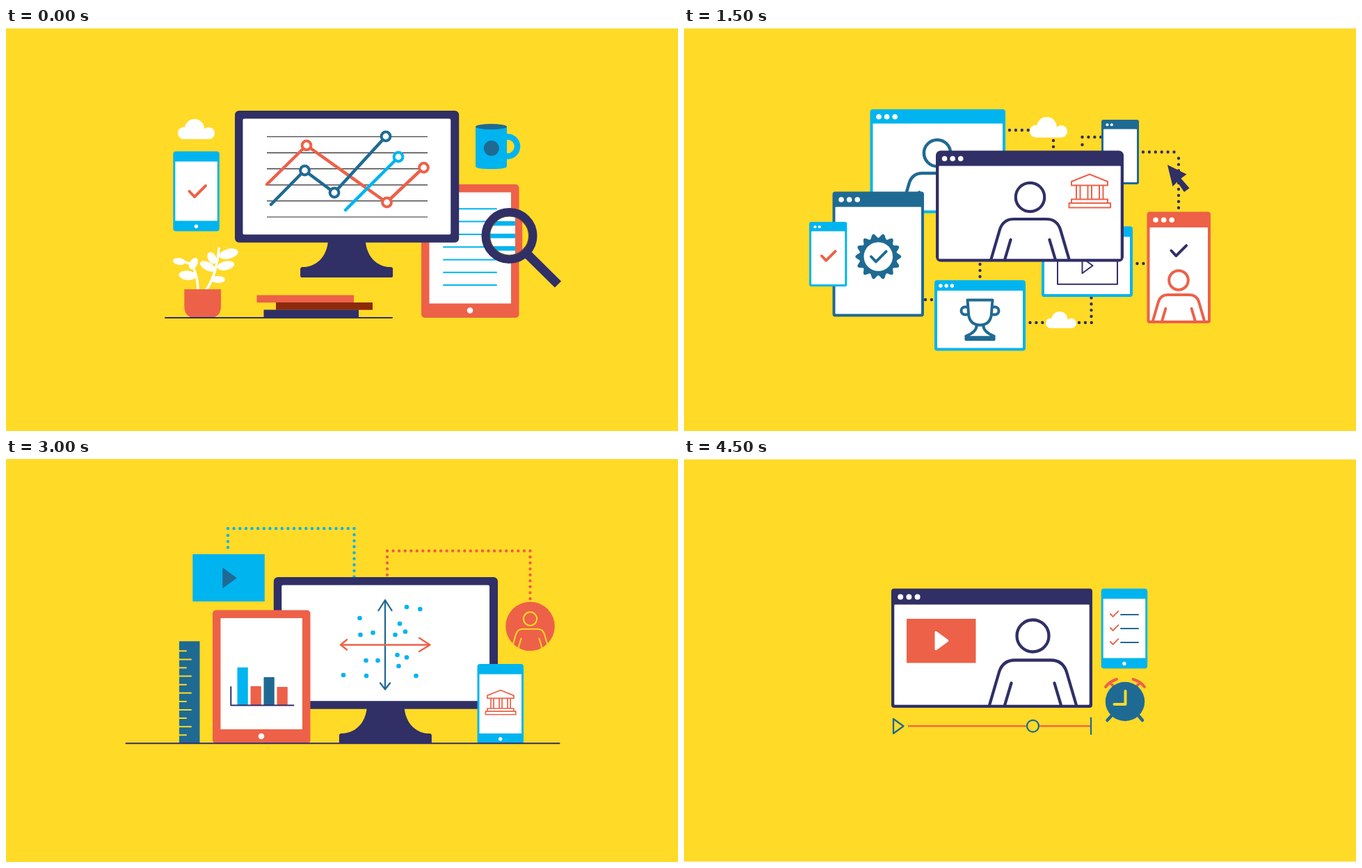
Recreate the animation shown at these times as an HTML page. Size 966 by 580 pixels, loop 5.25 s.

```html
<!DOCTYPE html>
<html lang="en">
<head>
<meta charset="utf-8">
<title>Digital work scenes</title>
<style>
html, body { margin: 0; width: 100%; height: 100%; overflow: hidden; background: #ffda27; }
svg { display: block; }
</style>
</head>
<body>
<svg id="stage" width="966" height="580" viewBox="0 0 966 580"></svg>
<script>
const SCENE_MS = 750;
const yellow = '#ffda27', navy = '#302f66', blue = '#00b4f0', teal = '#1f6a93',
  coral = '#ed6148', brown = '#8c2b0b', white = '#fff', edge = '#f8ecae';

// Primitives
const rect = (x, y, w, h, c, r = 0) => `<rect x="${x}" y="${y}" width="${w}" height="${h}" rx="${r}" fill="${c}"/>`;
const disc = (x, y, r, c) => `<circle cx="${x}" cy="${y}" r="${r}" fill="${c}"/>`;
const ring = (x, y, r, c, w, fill = 'none') => `<circle cx="${x}" cy="${y}" r="${r}" fill="${fill}" stroke="${c}" stroke-width="${w}"/>`;
const oval = (x, y, rx, ry, c, turn = 0) => `<ellipse rx="${rx}" ry="${ry}" fill="${c}" transform="translate(${x} ${y}) rotate(${turn})"/>`;
const shape = (d, c) => `<path d="${d}" fill="${c}" fill-rule="evenodd"/>`;
const line = (d, c, w, cap = 'round') => `<path d="${d}" fill="none" stroke="${c}" stroke-width="${w}" stroke-linecap="${cap}" stroke-linejoin="round"/>`;
const dotted = (d, c, gap = 8.7) => `<path d="${d}" fill="none" stroke="${c}" stroke-width="4.4" stroke-linecap="round" stroke-dasharray="0 ${gap}"/>`;
const group = (transform, ...parts) => `<g transform="${transform}">${parts.join('')}</g>`;
const place = (x, y, s, ...parts) => group(`translate(${x} ${y}) scale(${s})`, ...parts);
const range = (n, f) => Array.from({ length: n }, (_, i) => f(i)).join('');
const each = (points, f) => points.map(p => f(...p)).join('');

// Reusable objects
const ground = (x1, x2, y) => line(`M${x1} ${y}H${x2}`, navy, 2);
const cloud = (x, y, w) => place(x, y, w / 53,
  disc(8.8, 20.2, 8.8, white), disc(24, 14, 14, white), disc(44.4, 20.4, 8.6, white), rect(8.8, 16, 35.6, 13, white));
const check = (x, y, s, c, w) => line(`M${x} ${y}l${7.5 * s} ${8 * s} ${16 * s} ${-16 * s}`, c, w);
const person = (x, y, s, c, w) => place(x, y, s,
  ring(0, 0, 23, c, w / s),
  line('M-62.5 100L-48.5 52Q-43 35-26 35H26Q43 35 48.5 52L62.5 100M-40.5 100L-31 68M40.5 100L31 68', c, w / s));
const windowBox = (x, y, w, h, bar, c, b = 4, n = 3, r = 3.8, radius = 4) =>
  rect(x, y, w, h, c, radius) + rect(x + b, y + bar, w - 2 * b, h - bar - b, white, 1) +
  range(n, i => disc(x + r * (n > 2 ? 3.3 : 4) + i * 3.05 * r, y + bar / 2 + .5, r, white));
const tablet = (x, y) => rect(x, y, 140.5, 192, coral, 5) + rect(x + 11.5, y + 11.5, 117.5, 160, white) + disc(x + 70, y + 181.5, 4.3, white);
const phone = (x, y) => rect(x, y, 66.5, 115, blue, 4) + rect(x + 3, y + 14.7, 60.5, 85.3, white) + disc(x + 33.2, y + 108, 2.7, white);
const monitor = (x, y) => place(x, y, .996,
  rect(0, 0, 323.5, 190.5, navy, 6), rect(11.5, 11.5, 300, 167.5, white, 2),
  shape('M134.5 189C132 213 116 226 98 226Q94.5 226 94.5 229V239q0 2 2 2H226q2 0 2-2V229q0-3-3.5-3C207 226 191 213 188.5 189Z', navy));
const books = (x, y) => rect(x, y, 139.5, 10.7, coral) + rect(x + 27.5, y + 10.5, 139, 10.7, brown) + rect(x + 10, y + 21, 136.5, 11.5, navy);
const bank = (x, y, s) => place(x, y, s, line(
  'M4 17V11.5L30 1L56 11.5V17ZM11 17V37H16.5V17M27.5 17V37H33V17M44 17V37H49.5V17M4 37H56V42.5H4ZM.5 42.5H60V49H.5Z', coral, 2 / s ** .5));
const ruler = transform => group(transform, rect(0, 0, 29.5, 147, teal),
  range(11, i => line(`M0 ${14 + i * 12.1}H${i % 2 ? 17 : 10}`, yellow, 2)));
const video = (x, y) => rect(x, y, 103.5, 68, blue) + shape(`M${x + 43} ${y + 19.2}l20.5 15-20.5 15Z`, teal);
const badge = (x, y, r, c, face) => {
  const n = 280, points = Array.from({ length: n }, (_, i) => {
    const a = i / n * 2 * Math.PI, d = r * (.91 + .09 * Math.cos(14 * a));
    return (x + d * Math.cos(a)).toFixed(1) + ' ' + (y + d * Math.sin(a)).toFixed(1);
  });
  return shape(`M${points.join('L')}Z`, c) + disc(x, y, r * .63, face);
};
const trophy = (x, y, s, c, foot) => place(x, y, s, line(
  'M-30.5 0H30.5L27.5 38Q23 61 0 61Q-23 61-27.5 38ZM-30 17h-6.5a9.3 9.3 0 0 0 0 18.6h8.5M30 17h6.5a9.3 9.3 0 0 1 0 18.6h-8.5' + foot, c, 4 / s));
const bubble = (x, y, c) => rect(x, y, 94.5, 47.5, c, 14) + range(3, i => disc(x + 25 + i * 22.3, y + 24, 5.2, navy));
const node = (x, y, c, fill = white) => ring(x, y, 6.4, c, 4, fill);
const cross = (x, y, c) => line(`M${x - 7} ${y - 7}l14 14m0-14l-14 14`, c, 4);

const topEdge = rect(0, 0, 966, 1, edge), bottomEdge = rect(0, 579, 966, 1, edge);

const analytics = [
  topEdge, cloud(247, 131, 53), phone(240.3, 177.5), check(263.5, 235, 1, coral, 4),
  // plant
  line('M276 378Q276 358 268 342Q260 336 250 336M287 378Q303 356 306 317', white, 3.5),
  each([[249, 336, 9, 5, 8], [269.5, 339, 9, 5.5, -60], [261, 356, 12.5, 6.8, 5], [320, 325, 14, 7, -15],
    [296, 331, 9, 6, 62], [290, 343, 12, 6, 28], [316, 342, 12.5, 6.3, -12], [305, 362, 10, 5, 0]],
    (x, y, rx, ry, turn) => oval(x, y, rx, ry, white, turn)),
  shape('M256.3 376H309V400Q309 417 293 417H272Q256.3 417 256.3 400Z', coral),
  books(360.5, 384.5), ground(229, 555, 417),
  tablet(597, 225), range(7, i => line(`M629 ${260.3 + i * 18.3}H705`, blue, 2)),
  monitor(329, 119),
  range(6, i => line(`M375 ${156.5 + i * 23.1}H606`, '#2a2a2e', 1.2, 'butt')),
  line('M375 225L432 169L547 251L600 201', coral, 4.5),
  line('M381 254L429 205L472 237L546 156', teal, 4.5),
  line('M488 262L564 186', blue, 4.5),
  each([[432, 169], [547.5, 251], [600.5, 201]], (x, y) => node(x, y, coral)),
  each([[429.5, 205], [472, 237], [546, 156]], (x, y) => node(x, y, teal)),
  node(564, 185.5, blue),
  // mug
  ring(721, 170.5, 14, blue, 8.5), shape('M675 142H720V199Q720 203 697.5 203Q675 203 675 199Z', blue),
  oval(697.5, 142, 22.5, 4, teal), disc(697.8, 173, 11, teal),
  // magnifier
  line('M748 324L793.5 369', navy, 13, 'butt'),
  `<clipPath id="lens">${disc(723.5, 299, 30)}</clipPath><g clip-path="url(#lens)">`,
  rect(690, 265, 42, 70, white), rect(732, 265, 10.5, 70, coral), rect(742.5, 265, 15, 70, yellow),
  range(3, i => rect(690, 278 + i * 18, 42, 6.5, blue)), '</g>',
  ring(723.5, 299, 34, navy, 12), ring(723.5, 299, 28, '#574a35', 1.2)
];

const planning = [
  topEdge,
  group('translate(318 393) rotate(-5.6)', rect(0, -208, 321, 208, navy, 3), rect(12, -196, 297, 184, white, 1)),
  line('M391.5 190L410.5 369.5', navy, 2),
  range(8, i => line(`M${376 + i * 1.85} ${216.5 + i * 17.6}l-46 4.6`, navy, 4)),
  each([[441.5, 228.5, coral], [501, 222.3, navy], [560.5, 216.3, blue]], (x, y, c) =>
    ring(x, y, 16.7, c, 4) + line(`M${x - 9.7} ${y + 28}l26-2.5`, c, 4)),
  line('M431.5 281.5L436.5 334.5L588 319', navy, 4),
  line('M445 322L454 312Q460 306 466 313Q472 320 478 313L501 279Q507 270 512 278L515 284Q519 290 525 283Q529 280 533 283L554 301Q560 306 563 300L576 267', coral, 4.5),
  shape('M232.5 161L339 172.5L323.5 317.5L217 306Z', blue),
  line('M280 221L279 236.5M253 250L254.5 234L303.5 239L302 256', navy, 2, 'butt'),
  each([[281, 209.3], [251, 263], [300.3, 268]], (x, y) =>
    group(`translate(${x} ${y}) rotate(6)`, line('M-11-11H11V11H-11Z', white, 2))),
  ruler('translate(322 280) rotate(29.8) scale(.88 .855)'),
  rect(661.5, 160, 5.5, 11, teal), rect(657, 170, 14, 103, brown),
  shape('M657.5 275.5H670.5L664 286.5Z', brown), line('M655 179.5H678V211', coral, 4),
  shape('M599.5 311Q600 307 604 310L698 404Q701 409 696 409H599.5ZM617.5 355V387Q617.5 390 620.5 390H653Q658 389 655 386L622 353Q618 350 617.5 355Z', coral),
  range(10, i => line(`M${608 + i * 8} 409v${i % 2 ? -5 : -7}`, yellow, 2)),
  cloud(658, 310, 58.5)
];

const windows = [
  topEdge,
  dotted('M468 147H500M531 162V175M572.5 157H600M572.5 168V176M660 178.5H712M711 187.5V262M425.5 340V360M347 391H362M497.5 424H520M568 424H586M585.5 415V388M651.5 339H666', navy, 8.9),
  cloud(497, 128, 54), cloud(520, 408, 44),
  windowBox(267.5, 117, 194.5, 149.5, 20.5, blue), person(364, 180, .83, teal, 4.5),
  windowBox(600, 132, 54, 93, 13.5, teal, 3, 2, 2.1, 3),
  windowBox(514, 285.5, 131, 101.5, 15, blue, 4, 3, 2.7),
  line('M537 310H623V368.8H537Z', navy, 2), line('M572.5 331V353L587.5 342Z', navy, 2),
  windowBox(213.5, 235.5, 131.5, 180, 22, teal),
  badge(279.3, 329, 33, teal, white), check(269, 329, .92, teal, 4),
  windowBox(180, 279, 54.3, 93, 13.5, blue, 3, 2, 2.1, 3), check(198, 328, .83, coral, 4),
  windowBox(360, 363, 131, 101.5, 15, blue, 4, 3, 2.7),
  trophy(425.5, 391.5, .59, teal, 'M-8 61Q-8 78-34 88V96H34V88Q8 78 8 61M-34 91H34'),
  windowBox(665.5, 264.5, 91.5, 160.5, 22.5, coral), check(700.5, 320.5, .92, navy, 4), person(711, 363, .6, coral, 4),
  windowBox(362, 176.5, 270, 160, 22, navy, 4.3, 3, 3.8, 7), person(497.5, 243.5, .9, navy, 4.2), bank(553, 209.5, 1),
  shape('M695 197L722.5 210.5L714.5 216.5L726.5 230.5L719 236L709 221.5L702.5 228Z', navy)
];

const chat = [
  bottomEdge,
  dotted('M395 177H486M395 186.5V199', coral, 8.6), dotted('M550.5 177H622M621.5 186V250', blue, 8.9),
  cloud(486, 153.5, 62.5),
  tablet(312, 202), person(382, 307.3, .67, coral, 4.2), video(267, 181.5),
  shape('M286.5 325H337L333 394.5H290.5Z', brown), disc(311.7, 357, 10.7, coral),
  rect(285.5, 310, 52, 9, coral), rect(280.5, 317.7, 62, 7.8, coral),
  shape('M419.5 300V314Q420 319 425 315L439 302Z', coral), bubble(403, 256.5, coral),
  rect(509, 307, 59.5, 35, coral),
  line('M509 307.5L534 325.5Q538.7 329 543 325.5L568.5 307.5M510 341.5L527 320M567.5 341.5L550 320', yellow, 2, 'butt'),
  phone(588, 249), person(621, 308, .42, blue, 2),
  shape('M573 273L591 290V270Z', blue), bubble(513, 227, blue),
  books(534.5, 364), ground(261, 703, 395.5)
];

const devices = [
  dotted('M319 100H501M319 110V135M500.5 109V170', blue, 8.64),
  dotted('M548 132.3H754M548 141V170M753.5 141V204', coral, 8.56),
  video(268.3, 137), monitor(384.8, 170),
  line('M545 204V331M535.5 218L545 203L554.5 218M538 322.5L545 331.5L552 322.5', teal, 2.3),
  line('M481 267.5H609M594 257.5L609.5 267.5L594 277M490 260L481 267.5L490 274.5', coral, 2.3),
  each([[508.5, 229], [509.5, 253], [527.5, 250], [566, 237], [574, 248.5], [559.5, 253], [576, 213], [595.3, 216],
    [517.5, 290], [534.5, 290], [485, 311], [518, 312], [562.5, 282], [576, 285.5], [564.5, 298], [589.5, 312]],
    (x, y) => disc(x, y, 3.3, blue)),
  tablet(297, 217.5),
  each([[332.5, 300, blue], [351.5, 327, coral], [370.5, 314, teal], [389.5, 328, coral]], (x, y, c) => rect(x, y, 15.3, 354 - y, c, .8)),
  line('M323.3 328V354.5H413.5', navy, 2),
  ruler('translate(249 262.3)'),
  phone(677.5, 295), bank(689, 332, .73),
  disc(753.5, 240.8, 35.3, coral), person(753.5, 230, .42, yellow, 2),
  ground(172.5, 795.5, 409.3)
];

const strategy = [
  rect(314, 185, 268.5, 153, white), rect(286, 175, 324.3, 11.5, teal, 2.5),
  line('M447 338V358', teal, 4, 'butt'), ring(447, 364, 6, teal, 4),
  ring(447, 219.5, 9.2, teal, 4), ring(447, 298.5, 9.2, coral, 4),
  each([[482, 219.5, coral], [412, 243, navy], [447, 269, coral], [482, 269.5, navy], [412, 296, navy]], cross),
  ring(374, 277, 6.7, navy, 2.2), line('M381 277H405L447 243H531M519 231L531.5 243L519 255', navy, 2.2),
  trophy(316.7, 312, 1, coral, 'M-5 61Q-6 77-17 85M5 61Q6 77 17 85M-24 85H24V91H-24ZM-38 91.5H38V98H-38Z'),
  disc(580.2, 293.5, 26.5, teal),
  shape('M541 409V371.5Q523 371 517 352L498 287A12.3 12.3 0 0 1 521.5 279L537.5 333.5H615Q633 335 639 352L655.5 409H630.5L619 371V409Z', teal),
  badge(640, 234.3, 38.2, navy, yellow), check(628, 234, 1.1, navy, 4),
  ground(256, 676, 409.7)
];

const lesson = [
  topEdge, bottomEdge,
  windowBox(298, 186.5, 289, 171.5, 23, navy, 4.3, 3, 4), person(501.5, 254.5, 1, navy, 4.3),
  rect(320, 230, 99.5, 63.5, coral), shape('M360.5 249Q361 247 363 248L379.5 260Q381 261.5 379.5 263L363 275Q361 276 360.5 274Z', white),
  line('M301 374V395L315.5 384.5Z', teal, 2.3), line('M322 384.3H585', coral, 2.2, 'butt'),
  line('M585 372.5V396', teal, 2.2), ring(501.5, 384.3, 8.5, teal, 2.2, yellow),
  phone(599.7, 186.5),
  range(3, i => check(613, 223 + i * 20, .48, coral, 2) + line(`M628 ${224 + i * 20}H653`, teal, 2)),
  line('M615 369L608.5 376M653 369L659 376', teal, 4.5),
  line('M606 328Q612 320 622 317M645.5 317Q656 320 662 328M613 322L619 329M655 322L649 329', coral, 4),
  disc(634, 349, 28.2, teal), line('M634.5 334V353H618.5', yellow, 4)
];

const stage = document.getElementById('stage');
stage.innerHTML = [analytics, planning, windows, chat, devices, strategy, lesson]
  .map(parts => `<g visibility="hidden">${parts.join('')}</g>`).join('');
const scenes = [...stage.children];

function draw(now) {
  const current = Math.floor(now / SCENE_MS) % scenes.length;
  scenes.forEach((scene, i) => scene.setAttribute('visibility', i === current ? 'visible' : 'hidden'));
  requestAnimationFrame(draw);
}
draw(performance.now());
</script>
</body>
</html>
```
